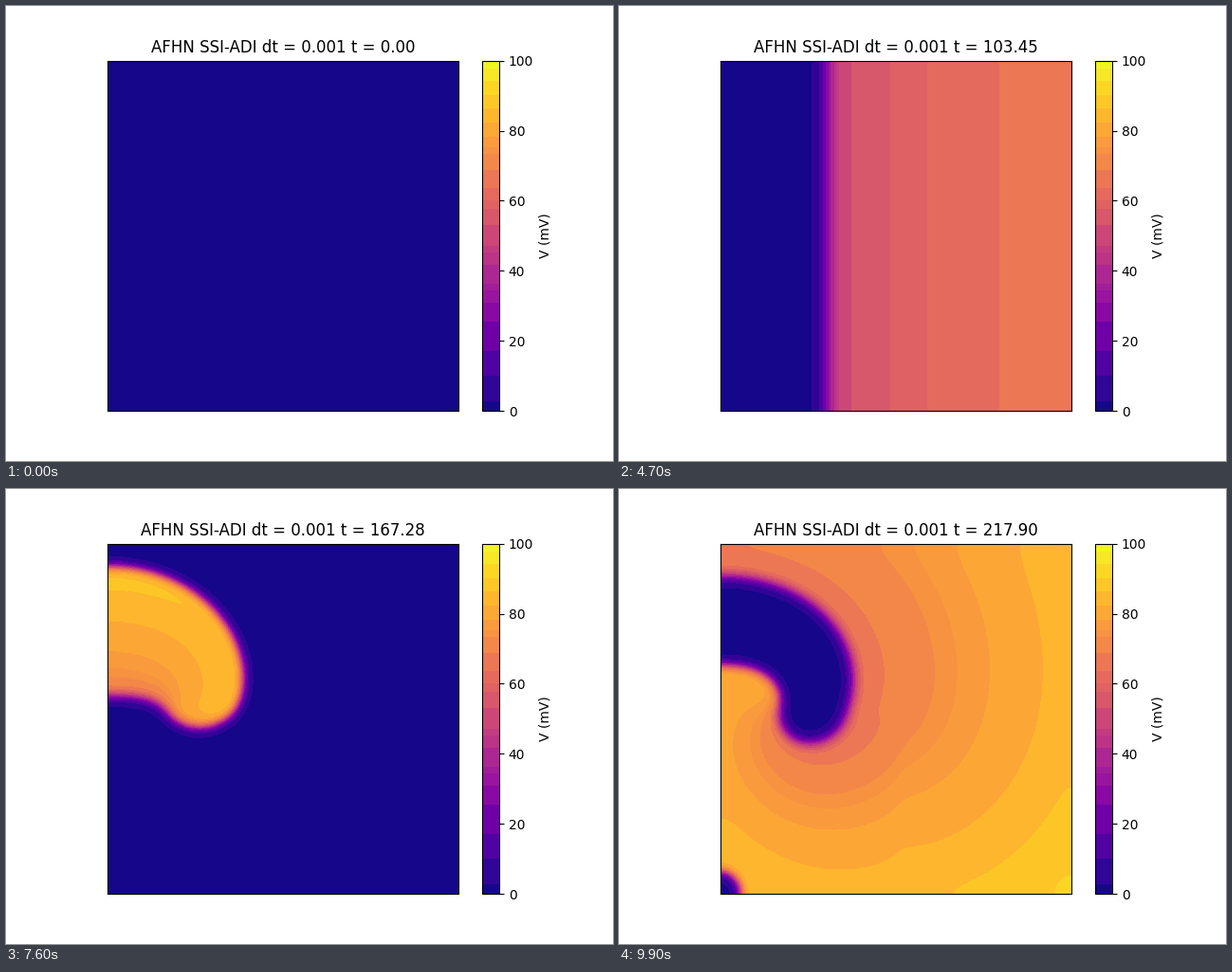
Animation of 640x480 px, one loop 10000 ms. Source, as a matplotlib script:

```python
import numpy as np
import matplotlib.pyplot as plt
from matplotlib.animation import FuncAnimation
from matplotlib.colors import ListedColormap

# Excitable sheet, 2 cm square: adapted FitzHugh-Nagumo, u = V / 100 mV
SIDE, DX = 2.0, 0.01
N = round(SIDE / DX) + 1
DIFF = 1.2e-3 / DX**2
GAIN, THRESH = 1.5 / 0.13, 0.13
ETA1, ETA2 = 4.4, 0.012

FRAMES = 100
FRAME_DT = 2.201
SUBSTEPS = 140
DT = FRAME_DT / SUBSTEPS

STIM_LEN = 2.0
S2_START = 120.0
FLOOR = 1e-12  # keeps the resting state clear of denormals


def rate(u, g):
    """Reaction plus diffusion with mirrored edges; g holds the linear loss."""
    p = np.empty((u.shape[0] + 2, N + 2), u.dtype)
    p[1:-1, 1:-1] = u
    p[0], p[-1] = p[2], p[-3]
    p[:, 0], p[:, -1] = p[:, 2], p[:, -3]
    r = u * -GAIN
    r += GAIN * (1 + THRESH)
    r *= u
    r -= g
    r *= u
    near = p[:-2, 1:-1] + p[2:, 1:-1]
    near += p[1:-1, :-2]
    near += p[1:-1, 2:]
    near *= DIFF
    r += near
    return r


def simulate():
    x = np.arange(N) * DX - 1e-9
    strip = np.where(x <= 0.2, 1.0, FLOOR).astype(np.float32)
    block = np.where((x[:, None] <= 1.0) & (x <= 1.0), 1.0, FLOOR).astype(np.float32)

    # A few identical rows are enough until the second stimulus
    u = np.zeros((3, N), np.float32)
    w = np.zeros_like(u)
    shots = []
    for step in range((FRAMES - 1) * SUBSTEPS + 1):
        if step % SUBSTEPS == 0:
            shots.append(100 * np.resize(u, (N, N)))
        t = step * DT
        stim = FLOOR
        if t < STIM_LEN:
            stim = strip
        elif S2_START <= t < S2_START + STIM_LEN:
            if len(u) < N:
                u, w = np.resize(u, (N, N)), np.resize(w, (N, N))
            stim = block

        g = w * ETA1
        g += GAIN * THRESH + 4 * DIFF
        k1 = rate(u, g)
        k1 += stim
        k2 = rate(u + DT * k1, g)
        k2 += stim
        k1 += k2
        k1 *= DT / 2
        u += k1
        w += (DT * ETA2) * (u - w)
    return shots


def banded_plasma():
    """Plasma cut into flat bands at the given voltages."""
    edges = [0, 2.7, 10.1, 17.2, 25.4, 30.9, 34.4, 36.3, 41.8, 45.3, 47.2, 53.1,
             58, 60, 63.5, 68.8, 73.4, 75.3, 78.3, 82.3, 86.4, 90.2, 94, 97.8, 100]
    edges = np.array(edges)
    mids = (edges[:-1] + edges[1:]) / 200
    band = np.searchsorted(edges[1:-1], (np.arange(256) + 0.5) / 2.56, side="right")
    return ListedColormap(plt.get_cmap("plasma")(mids[band]))


shots = simulate()

fig, ax = plt.subplots(figsize=(6.4, 4.8), dpi=100)
image = ax.imshow(shots[0], cmap=banded_plasma(), vmin=0, vmax=100,
                  origin="lower", interpolation_stage="data")
fig.colorbar(image, ax=ax, label="V (mV)")
ax.set_xticks([])
ax.set_yticks([])
title = ax.set_title("")


def draw(i):
    image.set_data(shots[i])
    title.set_text(f"AFHN SSI-ADI dt = 0.001 t = {i * FRAME_DT:.2f}")
    return image, title


anim = FuncAnimation(fig, draw, frames=FRAMES, interval=100, repeat=True)
plt.show()
```
